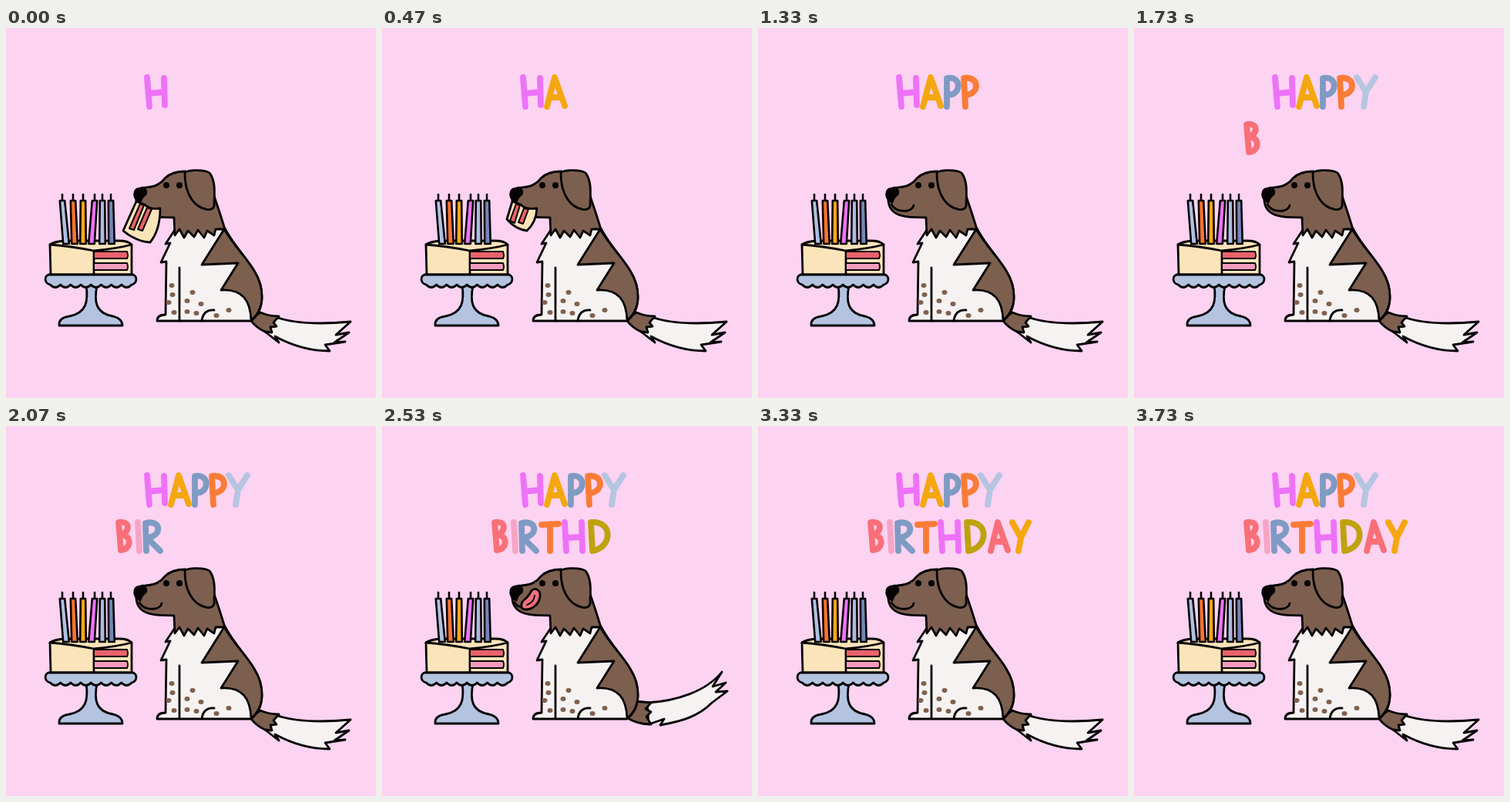
Write an HTML page that moves like this. It is 480 by 480 pixels and loops after 3790 ms.

```html
<!DOCTYPE html>
<html lang="en">
<head>
<meta charset="utf-8">
<title>Happy birthday</title>
<style>
  html, body { margin: 0; width: 100%; height: 100%; overflow: hidden; background: #fcd3f1; }
  svg { display: block; width: 100%; height: 100%; }
  .ink { stroke: #050304; stroke-width: 2.8; stroke-linecap: round; stroke-linejoin: round; fill: none; }
  .ink .thin { stroke-width: 2; }
  .brown { fill: #7d5f4f; }
  .white { fill: #f5f2f1; }
  .cream { fill: #fce4ba; }
  .blue { fill: #b4c3e0; }
  .red { fill: #ea626a; }
  .rose { fill: #f49abd; }
  .solid { fill: #050304; }
  .spots { fill: #80604f; }
  #lettering { fill: none; stroke-width: 7.8; stroke-linecap: round; stroke-linejoin: round; }
</style>
</head>
<body>
<svg viewBox="0 0 480 480" role="img" aria-label="Happy birthday: a dog eating cake">
  <g id="lettering"></g>

  <g class="ink">
    <path class="cream" d="M57 281Q63 277 76 276H147Q158 276 163 281V320H58Z"/>
    <path d="M57 281Q84 283 114 289Q145 286 163 281M114 289V320"/>
    <path class="red thin" d="M114 290H157Q159 295 157 299H114Z"/>
    <path class="rose thin" d="M114 305H157Q159 310 157 314H114Z"/>
    <g id="candles" stroke-width="2.6"></g>
    <path class="blue" d="M104 334C107 355 104 370 82 374Q68 376 69 386H151Q151 377 139 374C116 370 114 355 118 334Z"/>
    <path class="blue" id="plate"/>
  </g>

  <g class="ink" id="tailDown">
    <path class="white" d="M350 375C378 385 415 384 447 381L428 398L445 395L426 408L440 407L414 411L420 419C394 419 371 412 349 400L354 408L336 394Z"/>
    <path class="brown" d="M330 369Q341 374 354 374L347 382L351 387L343 388L345 395L336 394Q323 388 317 378Z"/>
  </g>
  <g class="ink" id="tailUp">
    <path class="white" d="M344 359C382 357 421 344 441 319L429 338L446 333L433 345L448 344L428 359C410 377 389 383 361 388L366 380L346 387Z"/>
    <path class="brown" d="M328 357L349 359L342 367L349 371L343 377L349 387Q331 387 317 378Z"/>
  </g>

  <g class="ink">
    <path class="white" d="M219 262L207 280L213 279L201 304L208 303L207 372Q196 372 196 380H318C337 365 335 336 322 315C312 298 296 283 284 260Z"/>
    <path class="brown" d="M283 261L254 307L301 305L279 340C307 338 317 354 318 379C337 364 335 336 322 315C312 298 296 283 283 261Z"/>
    <path d="M225 311V380M254 380C255 370 261 365 270 366"/>
    <g class="spots" id="spots" stroke="none"></g>
    <path class="brown" d="M168 215C169 208 178 207 181 207C193 206 200 203 206 195C214 187 224 186 233 186L270 218Q277 238 284 261L272 261L270 269L261 263L257 272L249 262L244 271L236 263L231 272L225 261L219 269L218 246C205 245 193 247 182 242Q170 237 169 224Z"/>
    <path class="brown" d="M232 188C236 183 259 184 264 188C273 199 270 219 270 231C267 239 255 235 248 230C236 220 232 203 232 188Z"/>
    <path class="solid" d="M167 213Q168 208 176 208Q184 209 181 216Q176 219 174 226Q165 221 167 213Z"/>
    <circle class="solid" cx="208" cy="204" r="3" stroke-width="2"/>
    <circle class="solid" cx="225" cy="204" r="3" stroke-width="2"/>
    <path id="smile" d="M173 229C178 237 187 238 194 237Q201 235 202 230"/>

    <g id="slice">
      <path class="cream" d="M169 225L152 263C161 271 176 278 187 278C196 267 200 253 200 234Q186 236 180 229Z"/>
      <path class="red thin" d="M174 228L179 230L166 262L160 260Z"/>
      <path class="red thin" d="M183 233L189 235L177 263L171 261Z"/>
    </g>
    <g id="halfSlice">
      <path class="cream" d="M169 225L162 248Q173 261 188 263Q200 252 201 234Q186 236 180 229Z"/>
      <path class="red thin" d="M174 228L179 230L172 253L166 250Z"/>
      <path class="red thin" d="M184 234L190 235L183 254L177 252Z"/>
    </g>
    <g id="lastBite">
      <path class="cream" d="M172 229C167 246 170 254 181 253Q202 251 203 233Q187 236 172 229Z"/>
      <path class="red thin" d="M177 233L182 235L180 247L175 247Z"/>
      <path class="red thin" d="M186 236L191 236L189 247L184 246Z"/>
    </g>
    <g id="tongue">
      <path d="M172 229Q175 234 181 235"/>
      <path fill="#f2707d" d="M181 234C179 226 190 224 193 215C197 208 206 212 205 221C204 232 194 238 187 238Q181 238 181 234Z"/>
      <path class="thin" d="M198 220Q197 229 188 232"/>
    </g>
  </g>
</svg>
<script>
const LOOP = 3790;
const el = id => document.getElementById(id);

// Appearance time, colour, strokes
const letters = [
  [0, '#ee72f8', 'M183 64L186 102M205 65L206 100M185 85L205 83'],
  [400, '#f4a70f', 'M214 102L224 64L237 101M218 90H233'],
  [800, '#7f9bc3', 'M245 102V65C264 61 265 87 246 87'],
  [1130, '#f97c36', 'M269 102L267 65C288 62 288 86 269 87'],
  [1400, '#b6c5e0', 'M289 64L301 83L313 64M301 83L298 102'],
  [1670, '#f96f78', 'M149 161L146 125C161 122 162 138 148 141C164 141 163 160 149 161'],
  [1870, '#f5a5c4', 'M171 125L173 162'],
  [2000, '#7f9bc3', 'M182 162L181 126C202 121 203 143 183 145L200 162'],
  [2200, '#f97c36', 'M207 128L229 127M218 128V162'],
  [2330, '#ee72f8', 'M237 125L239 162M259 125L260 162M239 145L259 144'],
  [2530, '#bea20f', 'M273 161L271 125C299 122 300 157 273 162'],
  [2730, '#f96f78', 'M302 162L311 125L324 161M306 150H320'],
  [2930, '#f4a70f', 'M330 125L341 145L351 125M341 145L338 162'],
];
el('lettering').innerHTML = letters.map(([, color, d]) => `<path stroke="${color}" d="${d}"/>`).join('');
const letterPaths = [...el('lettering').children];

// Top x, base x, colour
const candles = [
  [73, 78, '#b0c0e2'], [87, 89, '#f9742d'], [100, 100, '#f9a71b'],
  [115, 111, '#ee72f8'], [125, 125, '#a9bce0'], [136, 137, '#7684b8'],
];
el('candles').innerHTML = candles.map(([top, base, color]) =>
  `<path d="M${top} 216V223"/><path fill="${color}" d="M${top - 3.2} 224H${top + 3.2}L${base + 3.8} 280H${base - 3.8}Z"/>`
).join('');

el('plate').setAttribute('d',
  'M55 320H165C171 323 170 331 163 333' + 'q-6.6 7 -13.2 0'.repeat(8) + 'C50 331 49 323 55 320Z');

const spots = [[215, 334], [216, 346], [211, 356], [218, 369], [242, 343],
  [235, 354], [253, 358], [235, 368], [247, 370], [273, 373], [289, 366]];
el('spots').innerHTML = spots.map(([x, y]) =>
  `<ellipse cx="${x}" cy="${y}" rx="3.5" ry="3"/>`).join('');

// The tail switches between its two poses at these times
const tailFlips = [200, 400, 600, 800, 1000, 1200, 1400, 1600, 1800, 2000,
  2200, 2400, 2530, 2730, 2930, 3330, 3530, 3730];

const show = (node, visible) => node.style.display = visible ? '' : 'none';

function draw(now) {
  const t = now % LOOP;
  const during = (from, to) => t >= from && t < to;
  letterPaths.forEach((path, i) => show(path, t >= letters[i][0]));

  const up = tailFlips.filter(time => time <= t).length % 2 === 1;
  show(el('tailUp'), up);
  show(el('tailDown'), !up);

  const licking = during(2330, 2930);
  show(el('slice'), t < 400);
  show(el('halfSlice'), during(400, 800));
  show(el('lastBite'), during(800, 1200));
  show(el('tongue'), licking);
  show(el('smile'), t >= 1200 && !licking);
}

const start = performance.now();
function tick() {
  draw(performance.now() - start);
  requestAnimationFrame(tick);
}
tick();
</script>
</body>
</html>
```
